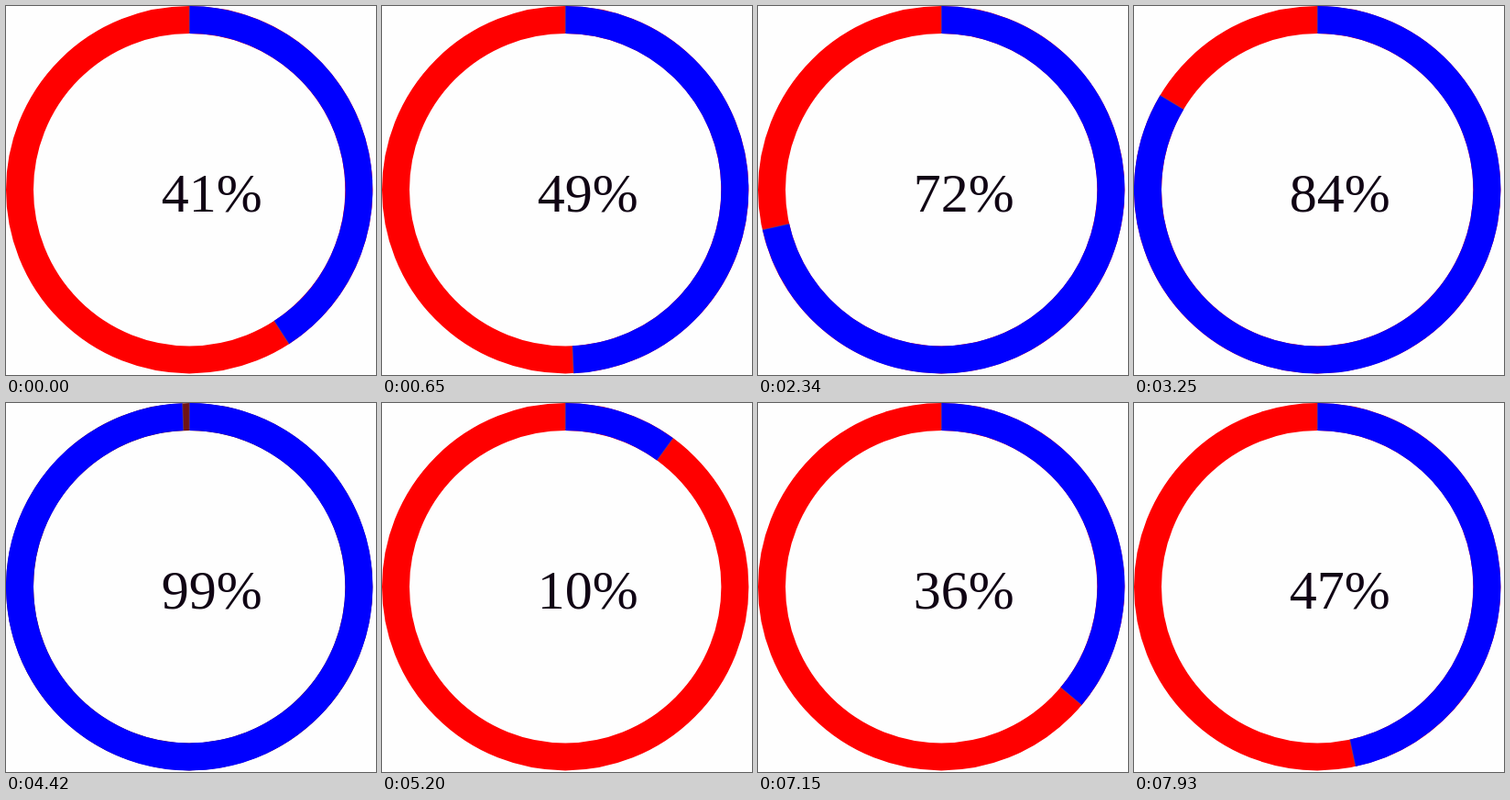
Recreate the animation shown at these times as an HTML page. Size 404 by 402 pixels, loop 8000 ms.

```html
<!DOCTYPE html>
<html lang="en">
<head>
<meta charset="utf-8">
<title>Progress ring</title>
<style>
  html, body { margin: 0; width: 100%; height: 100%; overflow: hidden; background: #fefefe; }
  svg { display: block; width: 100%; height: 100%; }
  text { font: 60px "Liberation Serif", "Times New Roman", Times, serif; fill: #100414; }
</style>
</head>
<body>
<svg viewBox="0 0 404 402">
  <g transform="translate(200.2 200.2)">
    <g fill="none" stroke-width="30">
      <circle id="rest" r="185.2" stroke="#f00"/>
      <path id="done" stroke="#00f"/>
    </g>
    <g stroke="#705c68" stroke-opacity=".65" stroke-width=".8">
      <path d="M0 -200.2V-170.2"/>
      <path id="edge" d="M0 -200.2V-170.2"/>
    </g>
  </g>
  <text id="label" x="169.7" y="223.6"></text>
</svg>
<script>
const LOOP = 8000, STEP = 130, RADIUS = 185.2;

// [step, running percentage]; the ring wraps at 100
const KEYS = [[0, 40.85], [11, 59.4], [25, 83.6], [34, 99.4], [40, 110], [49, 125.6], [61, 146.66]];

const [rest, done, edge, label] =
  ["rest", "done", "edge", "label"].map(id => document.getElementById(id));

function percentAt(step) {
  const i = Math.max(1, KEYS.findIndex(([s]) => s >= step));
  const [s0, v0] = KEYS[i - 1], [s1, v1] = KEYS[i];
  return (v0 + (v1 - v0) * (step - s0) / (s1 - s0)) % 100;
}

function render(time) {
  const percent = percentAt(Math.floor(time % LOOP / STEP));
  const angle = percent / 100 * 2 * Math.PI;
  const x = RADIUS * Math.sin(angle);
  const y = -RADIUS * Math.cos(angle);
  const large = percent > 50 ? 1 : 0;
  done.setAttribute("d", `M0 ${-RADIUS}A${RADIUS} ${RADIUS} 0 ${large} 1 ${x} ${y}`);
  edge.setAttribute("transform", `rotate(${percent * 3.6})`);
  // the last thin sliver darkens
  rest.setAttribute("stroke", percent > 99 ? "#701414" : "#f00");
  label.textContent = Math.round(percent) + "%";
}

const start = performance.now();
function tick() {
  render(performance.now() - start);
  requestAnimationFrame(tick);
}
tick();
</script>
</body>
</html>
```
